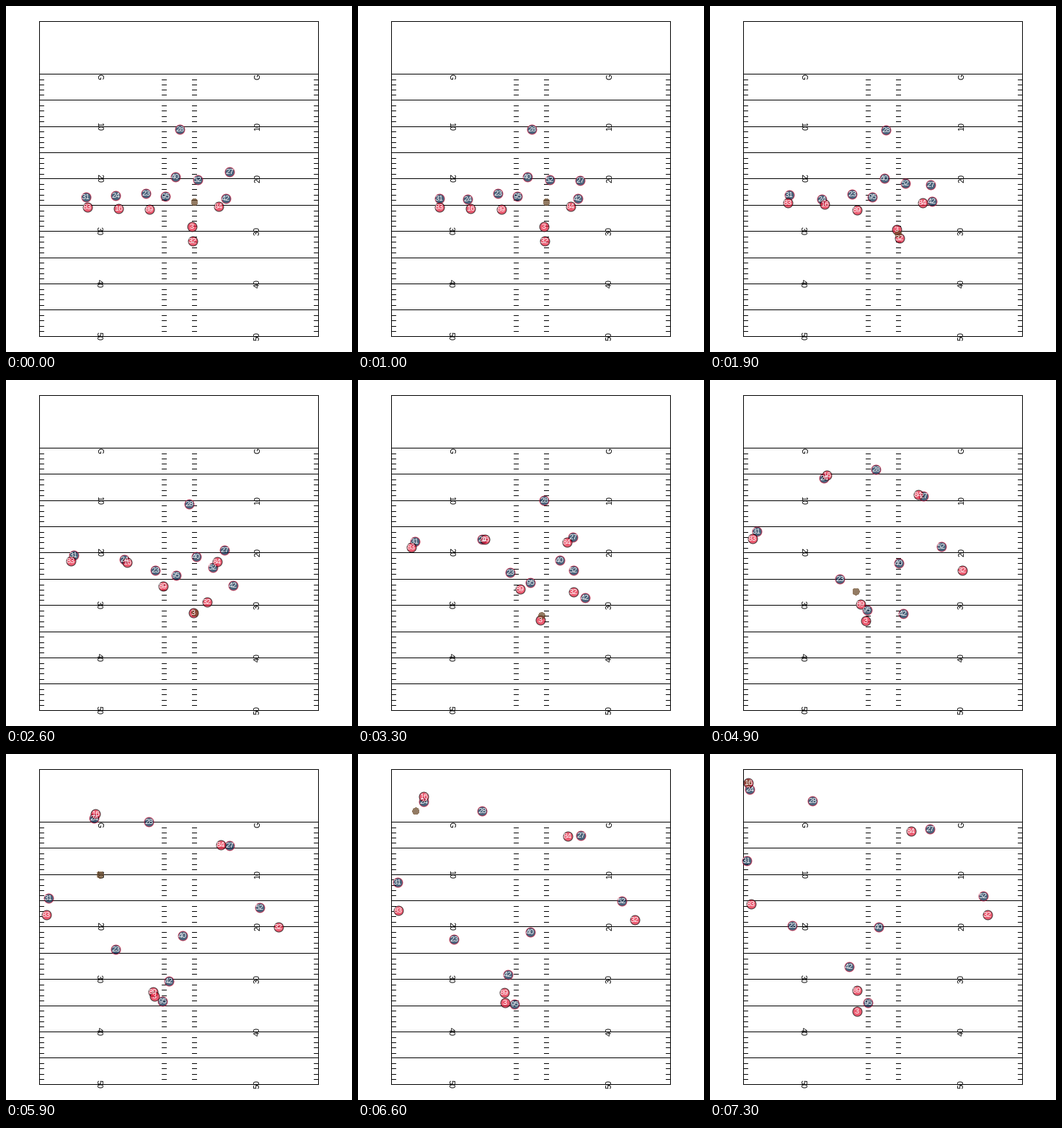
Recreate the animation shown at these times as a matplotlib script. Size 480 by 480 pixels, loop 7400 ms.

```python
import numpy as np
import matplotlib.pyplot as plt
from matplotlib.animation import FuncAnimation

SIZE, FRAMES, STEP = 480, 74, 100
LEFT, RIGHT, TOP, YARD = 46, 433, 21, 7.28
FONT = "Liberation Sans"
plt.rcParams.update({"text.hinting": "native", "text.hinting_factor": 1})

F = np.arange(FRAMES)
SNAP, MOVE = 12, 14            # ball leaves, players start to run
RELEASE, CATCH = 47, 67
BEATS = (0, 33, 41, 59, 73)
ZONE_BEATS = (0, 33, 59, 73)


def route(*points, beats=BEATS):
    """Wait at the first point, then run a smooth curve through the rest."""
    t = np.array([MOVE, *beats[1:]], float)
    p = np.array(points, float)
    h = np.diff(t)[:, None]
    d = np.diff(p, axis=0) / h
    m = np.zeros_like(p)
    m[1:-1] = (d[:-1] * h[1:] + d[1:] * h[:-1]) / (h[:-1] + h[1:])
    m[-1] = (3 * d[-1] - m[-2]) / 2
    f = np.maximum(F, MOVE)
    i = np.clip(np.searchsorted(t, f, side="right") - 1, 0, len(h) - 1)
    s = (f - t[i])[:, None] / h[i]
    return (p[i] + (p[i + 1] - p[i]) * s * s * (3 - 2 * s)
            + h[i] * s * (1 - s) * (m[i] * (1 - s) - m[i + 1] * s))


def cover(receiver, start, tight, end):
    """Close in on a receiver, then drift to the final gap."""
    start, tight, end = map(np.array, (start, tight, end))
    close = np.clip(F / 41, 0, 1)[:, None]
    drift = np.clip((F - 41) / 32, 0, 1)[:, None] ** 2
    return receiver + start + (tight - start) * close + (end - tight) * drift


offense = {
    "83": route((113, 279), (74, 232), (65, 220), (56, 223), (57, 208)),
    "16": route((156, 281), (176, 221), (178, 176), (124, 83), (53, 40)),
    "89": route((199, 282), (225, 290), (216, 296), (204, 330), (204, 328)),
    "84": route((295, 278), (290, 225), (283, 191), (298, 126), (279, 107)),
    "3": route((258, 306), (253, 333), (231, 335), (206, 336), (204, 357)),
    "32": route((259, 326), (299, 294), (323, 283), (378, 240), (385, 223)),
}
defense = {
    "31": cover(offense["83"], (-2, -14), (7, -6), (-6, -60)),
    "24": cover(offense["16"], (-4, -18), (-4, 4), (2, 9)),
    "27": cover(offense["84"], (15, -48), (6, 3), (26, -3)),
    "95": route((221, 264), (239, 281), (224, 297), (217, 343), (219, 345)),
    "52": route((266, 241), (299, 264), (302, 248), (352, 213), (379, 197)),
    "42": route((305, 267), (315, 302), (299, 321), (226, 315), (193, 295)),
    "23": route((194, 260), (211, 267), (152, 271), (114, 238), beats=ZONE_BEATS),
    "40": route((235, 237), (280, 250), (245, 252), (234, 240), beats=ZONE_BEATS),
    "28": route((241, 171), (258, 167), (198, 94), (142, 65), beats=ZONE_BEATS),
}


def ball_path(passer, catcher):
    """Snapped, carried, thrown at constant speed, then caught."""
    spot = np.array([261.5, 272])
    carried = passer + np.column_stack([np.full(FRAMES, 2),
                                        np.interp(F, [19, 33], [6, -6])])
    s = np.clip((F - SNAP) / 6, 0, 1)[:, None]
    path = spot + (carried - spot) * s
    thrown = np.array([217, 318.8]) + np.outer(F - RELEASE, [-7.2, -12.6])
    path[RELEASE:CATCH] = thrown[RELEASE:CATCH]
    path[CATCH:] = catcher[CATCH:]
    return path


def draw_field(ax):
    def row(yards):
        return int(TOP + YARD * yards + 0.5)

    def line(xs, ys):
        ax.plot(xs, ys, color="black", lw=1, antialiased=False,
                solid_capstyle="butt", zorder=1)

    for x in (LEFT, RIGHT):
        line([x, x], [TOP, row(60)])
    for yards in [0, *range(10, 61, 5)]:
        line([LEFT, RIGHT], [row(yards)] * 2)
    for yards in range(11, 60):
        if yards % 5:
            for x in (LEFT, 216, 258, RIGHT - 6):
                line([x, x + 6], [row(yards + 0.07)] * 2)

    for n in range(6):
        text, y = (str(10 * n), row(10 + 10 * n)) if n else ("G", 98.5)
        for x, angle in ((126, 270), (352, 90)):
            ax.text(x, y, text, rotation=angle, rotation_mode="anchor",
                    ha="center", va="baseline", fontsize=11,
                    family=FONT, zorder=1.5)


fig = plt.figure(figsize=(SIZE / 72, SIZE / 72), dpi=72, facecolor="white")
ax = fig.add_axes([0, 0, 1, 1])
ax.set_xlim(0, SIZE)
ax.set_ylim(SIZE, 0)
ax.axis("off")
draw_field(ax)


def dots(size, fill, edge, z):
    return ax.scatter([], [], s=size ** 2, c=fill, edgecolors=edge,
                      linewidths=1, alpha=0.7, antialiaseds=False, zorder=z)


def add_team(roster, fill, edge, z):
    labels = [ax.text(0, 0, name, color="white", fontsize=10, family=FONT,
                      ha="center", va="baseline", zorder=5) for name in roster]
    paths = np.round(list(roster.values()))
    return paths, dots(13, fill, edge, z), labels


teams = [add_team(defense, "#002244", "#c60c30", 2),
         add_team(offense, "#e31837", "black", 3)]
ball = ball_path(offense["3"], offense["16"])
ball_dot = dots(9, "#654321", "none", 4)


def update(i):
    for paths, marks, labels in teams:
        marks.set_offsets(paths[:, i])
        for (x, y), label in zip(paths[:, i], labels):
            label.set_position((x, y + 3))
    ball_dot.set_offsets([ball[i]])
    return []


anim = FuncAnimation(fig, update, frames=FRAMES, interval=STEP, repeat=True,
                     repeat_delay=0, init_func=lambda: update(0), blit=False)
plt.show()
```
